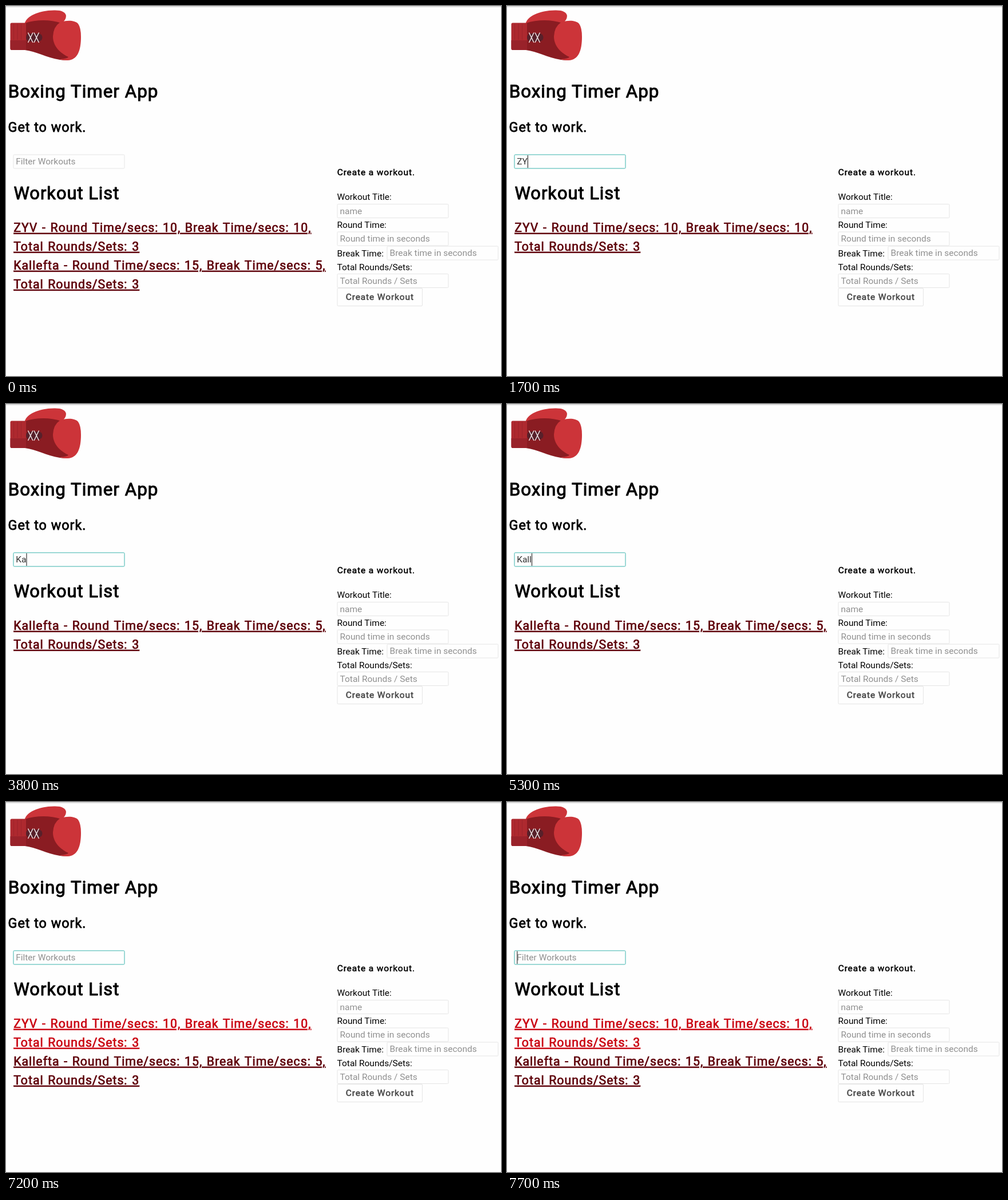
Animation of 865x647 px, one loop 8000 ms. Source, as an HTML page:

```html
<!DOCTYPE html>
<html lang="en">
<head>
<meta charset="utf-8">
<title>Boxing Timer App</title>
<style>
  html, body { margin: 0; width: 100%; height: 100%; overflow: hidden; background: #fefefe; }
  svg { display: block; width: 100%; height: 100%; font: 15.5px Roboto, sans-serif; }
  text { white-space: pre; }
  .bold { stroke: currentColor; fill: currentColor; letter-spacing: .97px; stroke-linejoin: round; }
  .h1 { font-size: 31.4px; stroke-width: 1px; }
  .h2 { font-size: 30.9px; stroke-width: 1px; }
  .h3 { font-size: 23.4px; stroke-width: .8px; }
  .small { stroke-width: .5px; letter-spacing: .87px; }
  .item { font-size: 21.3px; word-spacing: 1.4px; color: #5e0009; fill: currentColor;
          stroke: currentColor; stroke-width: .3px; text-decoration: underline; }
  .item .bold { stroke-width: .72px; }
  .item.hover { color: #ca0512; }
  .box { fill: #fefefe; stroke: #e5e5e5; }
  .box.focus { stroke: #38b2ac; }
  .hint { fill: #909090; }
  .typed { fill: #333; }
</style>
</head>
<body>
<svg viewBox="0 0 865 647">
  <defs>
    <linearGradient id="shade" x2="0" y2="1">
      <stop stop-color="#c8c8c8"/><stop offset="1" stop-color="#fefefe"/>
    </linearGradient>
  </defs>
  <rect width="865" height="3" fill="url(#shade)"/>

  <g id="glove">
    <path d="M33 29C50 21 100 20 112 34V93Q104 96 94 94C70 90 52 79 33 77Z" fill="#8a1c22"/>
    <path d="M33 30C36 18 56 8 84 7.500Q103 7 105 17Q105 25 97 30C76 23 52 24 33 30Z" fill="#cc3439"/>
    <path d="M94 29C104 25 119 24 126 31Q131 38 131 54C131 78 125 94 108 95Q99 95 94 93Q108 92 109 89C94 82 82 70 82 53Q83 36 94 29Z" fill="#cc3439"/>
    <path d="M10 29.500H35V77H10Q7.500 77 7.500 74V32Q7.500 29.500 10 29.500Z" fill="#ae292f"/>
    <path d="M7.500 60H35V77H10Q7.500 77 7.500 74Z" fill="#99222a"/>
    <path d="M13.500 31V59M20 31V59M26.500 31V59" stroke="#99222a" stroke-width=".8"/>
    <rect x="35" y="48" width="28.500" height="14" rx="7" fill="#57202a"/>
    <path d="M38.500 46.500L47 64M47 46.500L38.500 64M49 46.500L57.500 64M57.500 46.500L49 64" stroke="#eee3e4" stroke-width="1.500" fill="none"/>
  </g>

  <text class="bold h1" x="3.700" y="159.500">Boxing Timer App</text>
  <text class="bold h3" x="3.500" y="219.500">Get to work.</text>

  <rect id="filter" class="box" x="13" y="260" width="194" height="24" rx="1.500"/>
  <text id="entry" x="17.200" y="277"></text>
  <rect id="caret" y="261" width="1.200" height="22" fill="#333"/>

  <text class="bold h2" x="13.400" y="337.500">Workout List</text>
  <g id="list"></g>

  <text class="bold small" x="578.700" y="296">Create a workout.</text>
  <g id="form"></g>
  <rect class="box" x="579" y="493.500" width="148.500" height="31" rx="1.500"/>
  <text class="bold small" x="593.800" y="513.500" color="#444">Create Workout</text>
</svg>
<script>
const LOOP = 8000, FOCUS_TIME = 500;
const get = id => document.getElementById(id);

const fields = [
  { label: "Workout Title:", y: 339.2, hint: "name", x: 579, top: 346.5 },
  { label: "Round Time:", y: 388, hint: "Round time in seconds", x: 579, top: 395 },
  { label: "Break Time:", y: 437.5, hint: "Break time in seconds", x: 666, top: 420 },
  { label: "Total Rounds/Sets:", y: 461.5, hint: "Total Rounds / Sets", x: 579, top: 468.5 }
];
get("form").innerHTML = fields.map(f => `
  <text x="578.5" y="${f.y}">${f.label}</text>
  <rect class="box" x="${f.x}" y="${f.top}" width="194" height="24" rx="1.5"/>
  <text class="hint" x="${f.x + 4.5}" y="${f.top + 17.2}">${f.hint}</text>`).join("");

const workouts = [
  { title: "ZYV", round: 10, rest: 10, sets: 3 },
  { title: "Kallefta", round: 15, rest: 5, sets: 3 }
];
const itemLine = (text, y) =>
  `<text class="item" x="13.200" y="${y}"><tspan class="bold">${text}</tspan></text>`;
const items = workouts.map(({ title, round, rest, sets }) => {
  const item = document.createElementNS("http://www.w3.org/2000/svg", "g");
  item.innerHTML =
    itemLine(`${title} - Round Time/secs: ${round}, Break Time/secs: ${rest},`, 394.8) +
    itemLine(`Total Rounds/Sets: ${sets}`, 427.8);
  get("list").append(item);
  return item;
});

// Each step: start time, filter text, caret visible, hovered workout
const steps = [
  [0, "", false],
  [1700, "ZY", true],
  [1900, "ZYV", false],
  [2400, "ZY", true],
  [2600, "Z", true],
  [2800, "", false],
  [3800, "Ka", true],
  [4000, "Ka", false],
  [4400, "Kal", true],
  [4800, "Kalle", true],
  [5100, "Kalle", false],
  [5300, "Kall", true],
  [5800, "Kal", true],
  [5900, "K", true],
  [6000, "", true],
  [6500, "", false],
  [7200, "", false, 0],
  [7300, "", false, 1],
  [7600, "", false, 0],
  [7700, "", true, 0]
];

function draw(time) {
  const [, text, caretOn, hovered] = steps.findLast(step => step[0] <= time);
  const entry = get("entry"), caret = get("caret");

  get("filter").classList.toggle("focus", time >= FOCUS_TIME);
  entry.textContent = text || "Filter Workouts";
  entry.setAttribute("class", text ? "typed" : "hint");
  caret.setAttribute("x", 17.2 + (text ? entry.getComputedTextLength() : 0));
  caret.setAttribute("visibility", caretOn ? "visible" : "hidden");

  let row = 0;
  items.forEach((item, i) => {
    const shown = workouts[i].title.includes(text);
    item.setAttribute("display", shown ? "inline" : "none");
    item.setAttribute("transform", `translate(0 ${row * 66})`);
    for (const line of item.children) line.classList.toggle("hover", i === hovered);
    if (shown) row++;
  });
}

function tick() {
  draw(performance.now() % LOOP);
  requestAnimationFrame(tick);
}
tick();
</script>
</body>
</html>
```
